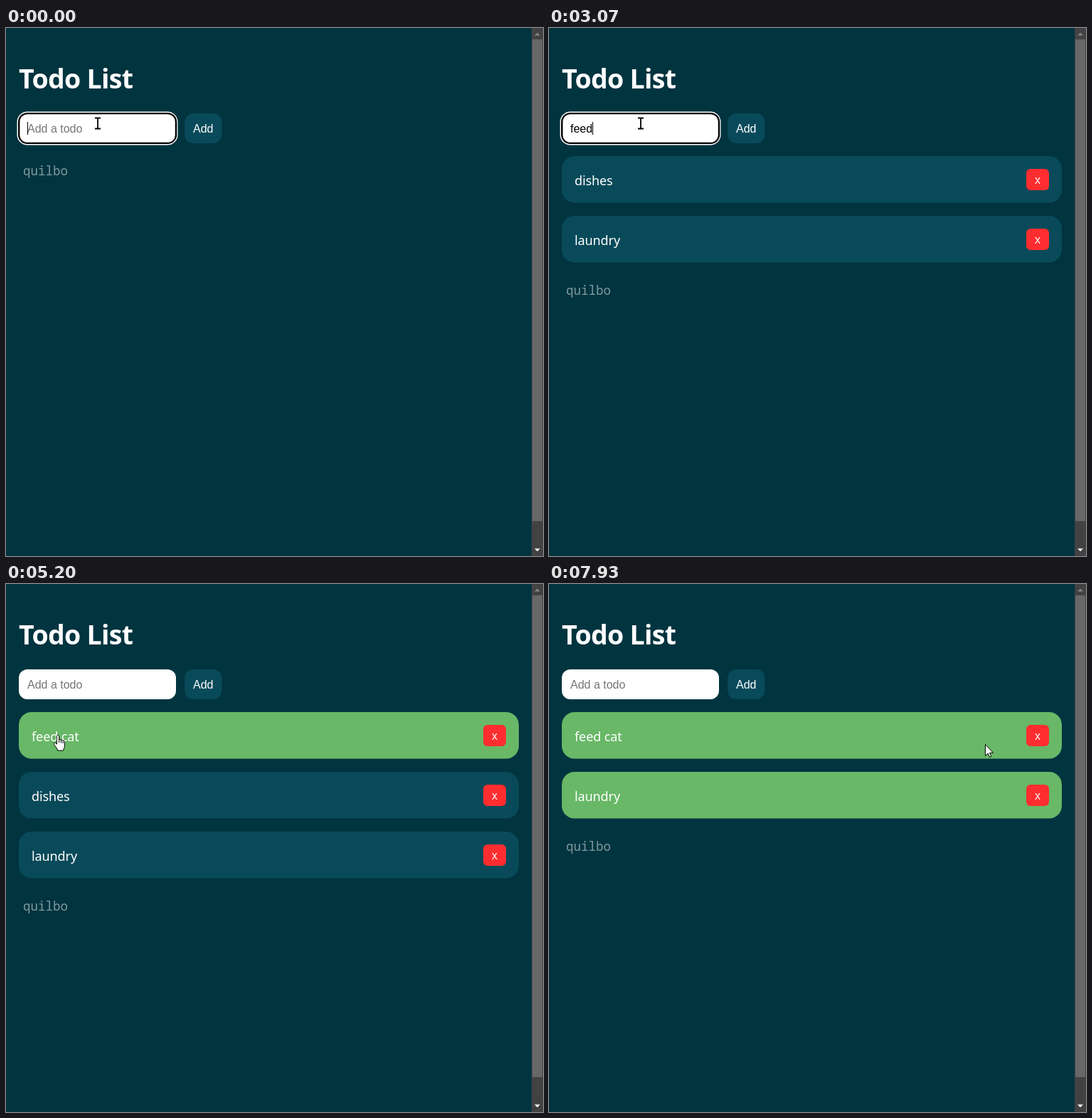
Recreate the animation shown at these times as an HTML page. Size 755 by 742 pixels, loop 8000 ms.

```html
<!DOCTYPE html>
<html lang="en">
<head>
<meta charset="utf-8">
<title>Todo List</title>
<style>
  html, body { margin: 0; width: 100%; height: 100%; overflow: hidden; background: #00343f; }
  svg { display: block; }
  text { white-space: pre; fill: #fff; font: 16px "Liberation Sans", Arial, sans-serif; }
  .title { font: bold 37.5px "Open Sans", "Noto Sans", sans-serif; letter-spacing: -.7px; }
  .label { font: 18px "Noto Sans", "Open Sans", sans-serif; letter-spacing: -.1px; }
  .link { font: 17.5px "Noto Sans Mono", monospace; fill: #7f999f; }
  .panel { fill: #094a5a; }
  .done .panel { fill: #68b867; }
  .mid { text-anchor: middle; }
  #hint { fill: #757575; }
  #typed { fill: #000; }
</style>
</head>
<body>
<svg id="stage" width="755" height="742" viewBox="0 0 755 742">
  <rect width="755" height="742" fill="#00343f"/>
  <text class="title" x="18" y="85">Todo List</text>

  <rect x="18" y="120" width="221" height="42" rx="12" fill="#fff"/>
  <g id="focus">
    <rect x="15.5" y="117.5" width="226" height="47" rx="14.5" fill="#fff"/>
    <rect x="17" y="119" width="223.2" height="44" rx="13" fill="#000"/>
    <rect x="19.4" y="121.2" width="218.4" height="39.6" rx="10.8" fill="#fff"/>
  </g>
  <text id="hint" x="30" y="146.5">Add a todo</text>
  <text id="typed" x="30" y="146.5"></text>
  <rect id="caret" y="132" width="1" height="18" fill="#000"/>

  <rect class="panel" x="251.3" y="120" width="52" height="42" rx="12"/>
  <text class="mid" x="277.2" y="146.5">Add</text>

  <g id="list"></g>
  <text id="link" class="link" x="24">quilbo</text>

  <rect x="739" width="16" height="742" fill="#424242"/>
  <rect x="740" y="16" width="14" height="677" fill="#686868"/>
  <path d="M743 10.5l4-4 4 4z" fill="#868686"/>
  <path d="M743 731.5l4 4 4-4z" fill="#fff"/>

  <g id="cursor" stroke="#000" stroke-linejoin="round">
    <path id="beam" fill="none" stroke-width="1.8"
      d="M-4-7.5h3q1 0 1 1 0-1 1-1h3M0-7V7M-4 7.5h3q1 0 1-1 0 1 1 1h3"/>
    <path id="arrow" fill="#fff" d="M.5.5V16.5L4.2 13 6.5 18.3 8.8 17.3 6.5 12.2H11.5Z"/>
    <path id="hand" fill="#fff"
      d="M-1.6 13V2C-1.6-.1 1.6-.1 1.6 2V7C2 6 4.3 6.2 4.4 7.8 5 6.8 7 7 7.1 8.6 7.8 7.8 9.4 8.3 9.4 10V15C9.4 18 8 19 7.6 22H-.4C-.8 19-3.2 17-5.6 13.2-6.6 11.6-4.6 10.4-3.2 11.6ZM1.6 7V11M4.4 7.8V11.5M7.1 8.6V12"/>
  </g>
</svg>
<script>
const LOOP = 8000, TOP = 180, PITCH = 84, ROW = 65.6, BLUR = 4930, FPS = 15;
const $ = id => document.getElementById(id);
const show = (el, on) => el.setAttribute('visibility', on ? 'visible' : 'hidden');
const place = (el, x, y) => el.setAttribute('transform', `translate(${x} ${y})`);

// keys: time of each keystroke; then when the item is added, ticked and removed
const todos = [
  { word: 'laundry', keys: [270, 400, 530, 730, 730, 870, 1000], added: 1400, ticked: 6270, removed: Infinity },
  { word: 'dishes', keys: [1530, 1600, 1800, 1930, 2000, 2200], added: 2330, ticked: Infinity, removed: 7730 },
  { word: 'feed cat', keys: [2670, 2670, 2870, 3070, 3270, 3470, 3530, 3730], added: 3870, ticked: 5200, removed: Infinity },
];

// pointer hot spot: time, x, y
const path = [
  [4200, 129, 134], [4730, 73, 212],
  [5200, 73, 212], [5730, 71, 377],
  [6330, 71, 377], [6530, 547, 301],
  [6600, 547, 301], [7200, 684, 291],
  [7730, 684, 291], [7930, 613, 225],
];

for (const todo of todos) {
  todo.el = document.createElementNS('http://www.w3.org/2000/svg', 'g');
  todo.el.innerHTML = `
    <rect class="panel" x="18" width="703" height="${ROW}" rx="18"/>
    <text class="label" x="36" y="40.7">${todo.word}</text>
    <rect x="671" y="18" width="32" height="30" rx="6" fill="#ff2d2f"/>
    <text class="mid" x="687" y="38.5">x</text>`;
  $('list').append(todo.el);
}

function pointerAt(t) {
  const next = path.findIndex(p => p[0] > t);
  if (next === 0) return path[0].slice(1);
  if (next < 0) return path[path.length - 1].slice(1);
  const [t0, x0, y0] = path[next - 1], [t1, x1, y1] = path[next];
  const u = (t - t0) / (t1 - t0), k = u * u * (3 - 2 * u);
  return [x0 + (x1 - x0) * k, y0 + (y1 - y0) * k];
}

function drawInput(t) {
  const current = todos.find(d => t < d.added);
  const text = current ? current.word.slice(0, current.keys.filter(k => k <= t).length) : '';
  $('typed').textContent = text;
  show($('hint'), !text);
  show($('focus'), t < BLUR);
  show($('caret'), t < 4400);
  $('caret').setAttribute('x', Math.round(30 + $('typed').getComputedTextLength()));
}

function drawList(t) {
  const live = todos.filter(d => d.added <= t && t < d.removed).reverse();
  for (const d of todos) {
    const i = live.indexOf(d);
    show(d.el, i >= 0);
    place(d.el, 0, TOP + PITCH * i);
    d.el.setAttribute('class', d.ticked <= t ? 'done' : '');
  }
  $('link').setAttribute('y', 206.5 + PITCH * live.length);
  return live.length;
}

function drawCursor(t, rows) {
  const tick = Math.floor((t + 4) * FPS / 1000) * 1000 / FPS;
  const [x, y] = pointerAt(tick);
  const row = Math.floor((y - TOP) / PITCH);
  const onRow = row >= 0 && row < rows && y - TOP - row * PITCH < ROW;
  // the arrow picked up between rows stays to the end
  const kind = y < 162 ? 'beam' : onRow && t < 7860 ? 'hand' : 'arrow';
  for (const id of ['beam', 'arrow', 'hand']) show($(id), id === kind);
  place($('cursor'), Math.round(x), Math.round(y));
}

function draw(t) {
  drawInput(t);
  drawCursor(t, drawList(t));
}

const start = performance.now();
function loop(now) {
  draw(Math.max(0, now - start) % LOOP);
  requestAnimationFrame(loop);
}
draw(0);
requestAnimationFrame(loop);
</script>
</body>
</html>
```
